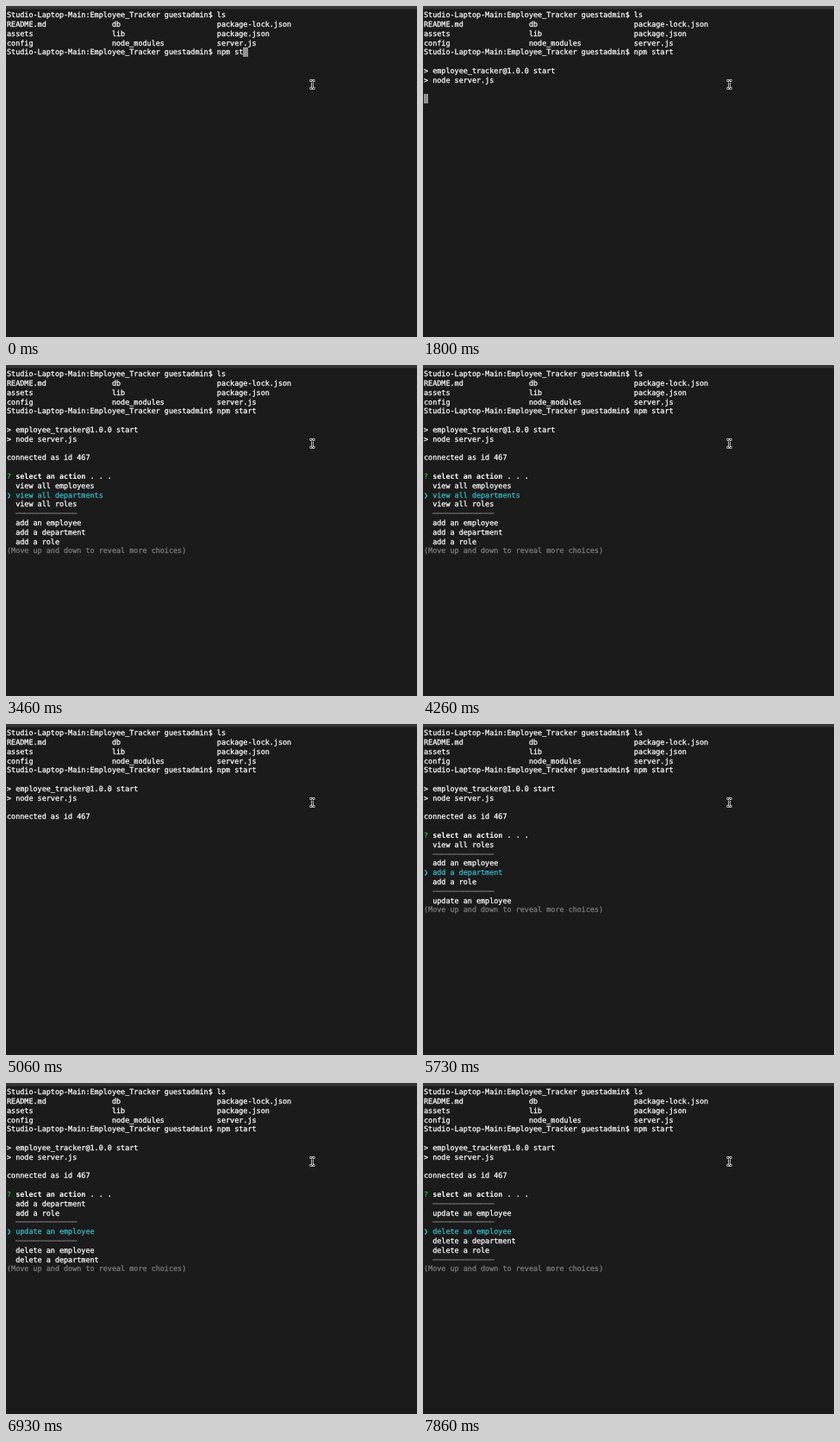
An HTML page for the animation above (8000 ms loop, 477 by 384 pixels).

```html
<!DOCTYPE html>
<html lang="en">
<head>
<meta charset="utf-8">
<title>Terminal menu</title>
<style>
  html, body { margin: 0; width: 100%; height: 100%; overflow: hidden; background: #1b1b1b; }
  #stage { position: relative; width: 477px; height: 384px; overflow: hidden; background: #1b1b1b; }
  #bar { height: 4px; background: linear-gradient(#363636 75%, #292929 75%); }
  #screen {
    position: absolute; left: 1px; top: 5.2px; margin: 0; color: #fff;
    font: 8.443px/10.79px "DejaVu Sans Mono", monospace;
    text-rendering: geometricPrecision;
    -webkit-text-stroke: .25px currentColor;
  }
  #cursor { position: absolute; width: 5.8px; height: 11px; background: #929292; }
  #pointer { position: absolute; left: 350px; top: 84px; }
  b { font-weight: 700; -webkit-text-stroke-width: 0; }
  .ok { color: #25b52b; }
  .pick { color: #33bbc8; }
  .dim { color: #7d7d7d; }
  .mark { display: inline-block; width: 1ch; height: 10.79px; vertical-align: top; }
</style>
</head>
<body>
<div id="stage">
  <div id="bar"></div>
  <div id="cursor"></div>
  <pre id="screen"></pre>
  <svg id="pointer" width="11" height="14" fill="none">
    <path id="beam" stroke="#e8e8e8" stroke-width="2.5" d="M2.5 2.5H4.5L5.5 3.5L6.5 2.5H8.5M5.5 3.5V10.5M2.5 11.5H4.5L5.5 10.5L6.5 11.5H8.5"/>
    <path stroke="#111" stroke-width=".9" d="M3 2.5H4.5L5.5 3.5L6.5 2.5H8M5.5 3.5V10.5M3 11.5H4.5L5.5 10.5L6.5 11.5H8"/>
  </svg>
</div>
<script>
const LOOP = 8000, CELL = 5.083, LINE = 10.79, PAGE = 7;
const screen = document.getElementById('screen');
const cursor = document.getElementById('cursor');

const PROMPT = 'Studio-Laptop-Main:Employee_Tracker guestadmin$ ';
const columns = (...cells) => cells.map(c => c.padEnd(24)).join('').trimEnd();
const LISTING = [
  PROMPT + 'ls',
  columns('README.md', 'db', 'package-lock.json'),
  columns('assets', 'lib', 'package.json'),
  columns('config', 'node_modules', 'server.js')
];
const STARTUP = ['', '&gt; employee_tracker@1.0.0 start', '&gt; node server.js', ''];

const RULE = '─'.repeat(14);
const CHOICES = [
  'view all employees', 'view all departments', 'view all roles', RULE,
  'add an employee', 'add a department', 'add a role', RULE,
  'update an employee', RULE,
  'delete an employee', 'delete a department', 'delete a role', RULE
];

const TYPED = [[0, 6], [60, 7], [260, 8], [530, 9]];
const ENTER = 860, LAUNCH = 1800, MENU = 2600;
// Time and selected choice; -1 is the cleared menu.
const PICKS = [
  [MENU, 0], [3460, 1], [4400, 2], [5060, -1], [5130, 4],
  [5660, 5], [6130, 6], [6800, 8], [7600, 10]
];
const valueAt = (steps, t) => steps.filter(([at]) => at <= t).pop()[1];

function choiceLine(text, selected) {
  if (text === RULE) return `  <span class="dim">${RULE}</span>`;
  return selected
    ? `<span class="pick"><span class="mark">❯</span> ${text}</span>`
    : '  ' + text;
}

function menuLines(active) {
  if (active < 0) return [];
  const first = Math.max(0, active - (PAGE >> 1));
  const hint = active === 0 ? ' <span class="dim">(Use arrow keys)</span>' : '';
  return [
    '',
    `<b><span class="ok">?</span> select an action . . .</b>${hint}`,
    ...CHOICES.slice(first, first + PAGE)
      .map((text, i) => choiceLine(text, first + i === active)),
    '<span class="dim">(Move up and down to reveal more choices)</span>'
  ];
}

function placeCursor(col, row) {
  cursor.style.left = .7 + col * CELL + 'px';
  cursor.style.top = 4.9 + row * LINE + 'px';
}

let shown = '';
function draw(now) {
  const t = now % LOOP;
  const typed = valueAt(TYPED, t);
  const lines = [...LISTING, PROMPT + 'npm start'.slice(0, typed)];
  if (t >= LAUNCH) lines.push(...STARTUP);
  if (t >= MENU) lines.push('connected as id 467', ...menuLines(valueAt(PICKS, t)));

  const html = lines.join('\n');
  if (html !== shown) screen.innerHTML = shown = html;

  cursor.style.display = t < MENU ? 'block' : 'none';
  if (t < ENTER) placeCursor(PROMPT.length + typed, 4);
  else placeCursor(0, t < LAUNCH ? 5 : 9);
}

function tick(now) {
  draw(now);
  requestAnimationFrame(tick);
}
draw(0);
requestAnimationFrame(tick);
</script>
</body>
</html>
```
